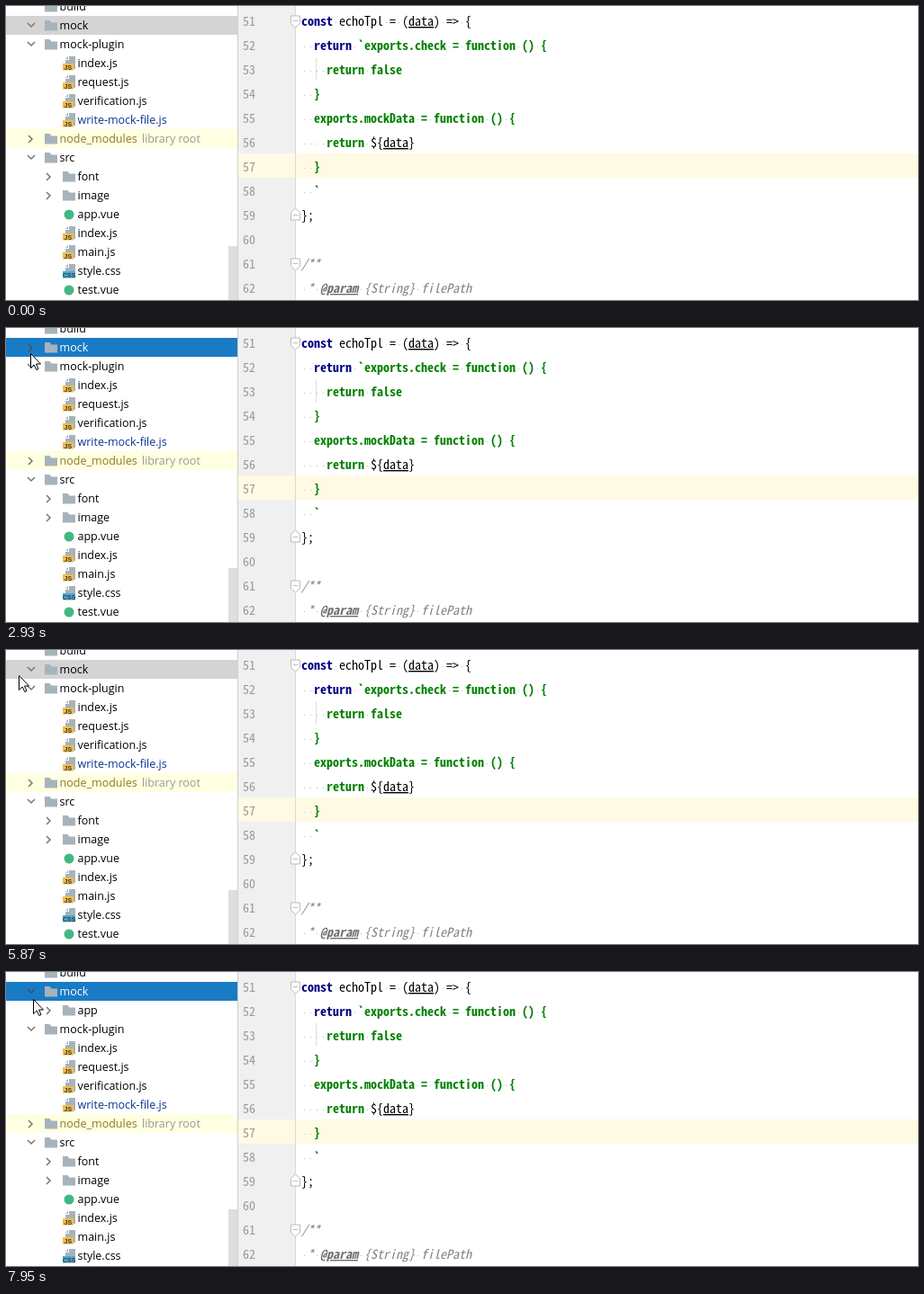
Write an HTML page that moves like this. It is 1013 by 327 pixels and loops after 8000 ms.

```html
<!DOCTYPE html>
<html lang="en">
<head>
<meta charset="utf-8">
<title>Project tree</title>
<style>
html, body { margin: 0; width: 100%; height: 100%; overflow: hidden; background: #fff; }
svg { display: block; width: 1013px; height: 327px; }
text { white-space: pre; }
.tree { font: 12.5px "Open Sans", "Noto Sans", sans-serif; }
.code { font: 14px "Noto Sans Mono CJK SC", "Noto Sans Mono CJK JP", "Noto Sans CJK SC", monospace; }
.badge { font: bold 7px "Liberation Sans", Arial, sans-serif; fill: #3c3a32; }
.num { fill: #999; }
.kw { fill: #000080; font-weight: bold; }
.str { fill: #008000; font-weight: bold; }
.doc { fill: #808080; font-style: italic; }
.tag { fill: #707070; font-style: italic; font-weight: bold; text-decoration: underline; }
.var { text-decoration: underline; }
</style>
</head>
<body>
<svg id="stage" viewBox="0 0 1013 327"></svg>
<script>
const NS = "http://www.w3.org/2000/svg";
const stage = document.getElementById("stage");

function add(parent, tag, attrs = {}, text) {
  const el = document.createElementNS(NS, tag);
  for (const key in attrs) el.setAttribute(key, attrs[key]);
  if (text !== undefined) el.textContent = text;
  return parent.appendChild(el);
}
const rect = (parent, x, y, width, height, fill) =>
  add(parent, "rect", { x, y, width, height, fill });

// ---- project tree ----
const ROW = 21;
const RIGHT = "M-2 -4 L2 0 L-2 4";
const DOWN = "M-4 -2 L0 2 L4 -2";

function chevron(parent, x, y, d) {
  return add(parent, "path", {
    d, transform: `translate(${x} ${y})`, fill: "none", stroke: "#767676", "stroke-width": 1.5
  });
}

function folder(parent, x, y) {
  add(parent, "path", {
    d: `M${x} ${y - 6}h5.5l2 2.5h6.5v9h-14z`, fill: "#a7b3bb"
  });
}

function fileIcon(parent, x, y, kind) {
  if (kind === "vue") {
    add(parent, "circle", { cx: x + 7, cy: y, r: 5.5, fill: "#41b883" });
    return;
  }
  add(parent, "path", { d: `M${x + 7} ${y - 8}h7v14h-11v-10h4z`, fill: "#a7b3bb" });
  add(parent, "path", { d: `M${x + 6} ${y - 8}v3h-3z`, fill: "#a7b3bb" });
  const css = kind === "css";
  rect(parent, x, y, css ? 14 : 12, 7.5, css ? "#48acdc" : "#f2bd4b");
  add(parent, "text", { x: x + (css ? 0 : 1.5), y: y + 6.5, class: "badge" }, kind.toUpperCase());
}

// [name, level, kind, colour]; kind is a chevron direction or a file type
function row(parent, [name, level, kind, color = "#000"], y) {
  const x = 43 + level * 20;
  const dir = kind === "open" || kind === "shut" || kind === "none";
  if (dir) folder(parent, x, y);
  else fileIcon(parent, x, y, kind);
  if (kind === "open") chevron(parent, x - 15, y - 1, DOWN);
  if (kind === "shut") chevron(parent, x - 16, y, RIGHT);
  return add(parent, "text", { x: x + 16.5, y: y + 4, class: "tree", fill: color }, name);
}

row(stage, ["build", 0, "none"], 1);
const bar = rect(stage, 0, 11, 257, ROW, "#d4d4d4");
const label = row(stage, ["mock", 0, "none"], 22);
const arrow = chevron(stage, 28, 21, DOWN);
const child = add(stage, "g");
row(child, ["app", 1, "shut"], 43);

const rest = add(stage, "g");
rect(rest, 0, 137, 257, ROW, "#ffffe1");
[
  ["mock-plugin", 0, "open"],
  ["index.js", 1, "js"],
  ["request.js", 1, "js"],
  ["verification.js", 1, "js"],
  ["write-mock-file.js", 1, "js", "#0a3592"],
  ["node_modules", 0, "shut", "#8f7a1c"],
  ["src", 0, "open"],
  ["font", 1, "shut"],
  ["image", 1, "shut"],
  ["app.vue", 1, "vue"],
  ["index.js", 1, "js"],
  ["main.js", 1, "js"],
  ["style.css", 1, "css"],
  ["test.vue", 1, "vue"]
].forEach((item, i) => row(rest, item, 43 + i * ROW));
add(rest, "text", { x: 151, y: 152, class: "tree", fill: "#999" }, "library root");
const thumb = rect(stage, 247, 267, 10, 64, "#dedede");

// ---- editor ----
const LINE = 27, CELL = 7, LEFT = 328;
rect(stage, 257, 0, 1, 327, "#d0d0d0");
rect(stage, 258, 0, 64, 327, "#f0f0f0");
rect(stage, 258, 164, 755, LINE, "#fffae3");
rect(stage, 321, 0, 1, 327, "#d8d8d8");
rect(stage, 344, 57, 1, 26, "#dedede");

// each line is a run of [text, class] pairs
const lines = [
  [["const", "kw"], [" echoTpl = ("], ["data", "var"], [") => {"]],
  [["  "], ["return", "kw"], [" "], ["`exports.check = function () {", "str"]],
  [["    return false", "str"]],
  [["  }", "str"]],
  [["  exports.mockData = function () {", "str"]],
  [["    return ", "str"], ["${"], ["data", "var"], ["}"]],
  [["  }", "str"]],
  [["  `", "str"]],
  [["};"]],
  [],
  [["/**", "doc"]],
  [[" * ", "doc"], ["@param", "tag"], [" {String} filePath", "doc"]]
];

// start of every character cell on a line
const cells = (x, count) => Array.from({ length: count }, (_, k) => x + k * CELL).join(" ");

lines.forEach((runs, i) => {
  const y = 18 + i * LINE;
  add(stage, "text", { x: cells(263, 2), y: y + 4, class: "code num" }, 51 + i);
  const chars = runs.map(run => run[0]).join("");
  const line = add(stage, "text", { x: cells(LEFT, chars.length), y: y + 4, class: "code" });
  for (const [text, cls = ""] of runs) add(line, "tspan", { class: cls }, text);
  [...chars].forEach((ch, k) => {
    if (ch === " ") rect(stage, LEFT + k * CELL + 3, y, 1, 1, "#bdbdbd");
  });
});

function foldMark(y, flip) {
  add(stage, "path", {
    d: "M-5 -6.5H5V2L0 6.5L-5 2ZM-2.5 -1H2.5", fill: "#fff", stroke: "#bcbcbc",
    transform: `translate(321.5 ${y}) scale(1 ${flip})`
  });
}
foldMark(17.5, 1);
foldMark(231.5, -1);
foldMark(287.5, 1);

// ---- pointer ----
const pointer = add(stage, "path", {
  d: "M.5 .5V16.5L4.2 13L6.8 18.5L9 17.5L6.6 12H11.5Z",
  fill: "#fff", stroke: "#000", "stroke-width": 1
});
const beam = add(stage, "path", {
  d: "M-3 -7.5H-1L0 -6.5L1 -7.5H3M0 -6.5V6.5M-3 7.5H-1L0 6.5L1 7.5H3",
  fill: "none", stroke: "#222"
});

// ---- timeline ----
const LOOP = 8000, TICK = 77;
const trips = [
  { end: 3540, keys: [
    [1370, 584, 142], [2060, 32, 21], [2230, 32, 21], [2380, 21, 10], [2690, 21, 10],
    [2775, 16, 14], [2930, 27, 28], [3075, 27, 28], [3160, 13, 14], [3463, 315, 78]
  ] },
  { end: LOOP, keys: [
    [4400, 160, 183], [5180, 1000, 128], [5870, 14, 28], [6015, 14, 28], [6330, 33, 22],
    [6700, 33, 22], [6870, 30, 13], [7015, 30, 13], [7400, 33, 22], [7800, 19, 11],
    [7950, 30, 30]
  ] }
];
// [time, row colour, label colour, expanded]
const states = [
  [0, "#d4d4d4", "#000", true],
  [2140, "#1a7bc5", "#fff", false],
  [3160, "#1a7bc5", "#fff", true],
  [4020, "#d4d4d4", "#000", true],
  [6410, "#1a7bc5", "#fff", false],
  [6640, "#1a7bc5", "#fff", true],
  [7330, "#1a7bc5", "#fff", false],
  [7560, "#1a7bc5", "#fff", true]
];
const FILLED = 6640;

function place(t) {
  const trip = trips.find(({ keys, end }) => t >= keys[0][0] && t < end);
  if (!trip) return null;
  const { keys } = trip;
  const i = keys.findLastIndex(k => k[0] <= t);
  const [t0, x0, y0] = keys[i];
  const [t1, x1, y1] = keys[i + 1] || [LOOP, x0, y0];
  const u = Math.floor((t - t0) / TICK) * TICK / (t1 - t0);
  const e = u * (2 - u);
  return [Math.round(x0 + (x1 - x0) * e), Math.round(y0 + (y1 - y0) * e)];
}

const show = (el, on) => el.setAttribute("visibility", on ? "visible" : "hidden");

function draw(t) {
  const [, back, ink, open] = states.findLast(s => s[0] <= t);
  const grown = open && t >= FILLED;
  bar.setAttribute("fill", back);
  label.setAttribute("fill", ink);
  arrow.setAttribute("d", open ? DOWN : RIGHT);
  arrow.setAttribute("transform", open ? "translate(28 21)" : "translate(27 22)");
  arrow.setAttribute("stroke", ink === "#fff" ? "#3f5263" : "#767676");
  show(child, grown);
  rest.setAttribute("transform", `translate(0 ${grown ? ROW : 0})`);
  thumb.setAttribute("y", grown ? 264 : 267);

  const at = place(t);
  const inText = at && at[0] > LEFT;
  show(pointer, at && !inText);
  show(beam, inText);
  if (at) {
    pointer.setAttribute("transform", `translate(${at[0]} ${at[1]})`);
    beam.setAttribute("transform", `translate(${at[0] + 0.5} ${at[1]})`);
  }
}

const start = performance.now();
function frame() {
  draw((performance.now() - start) % LOOP);
  requestAnimationFrame(frame);
}
frame();
</script>
</body>
</html>
```
